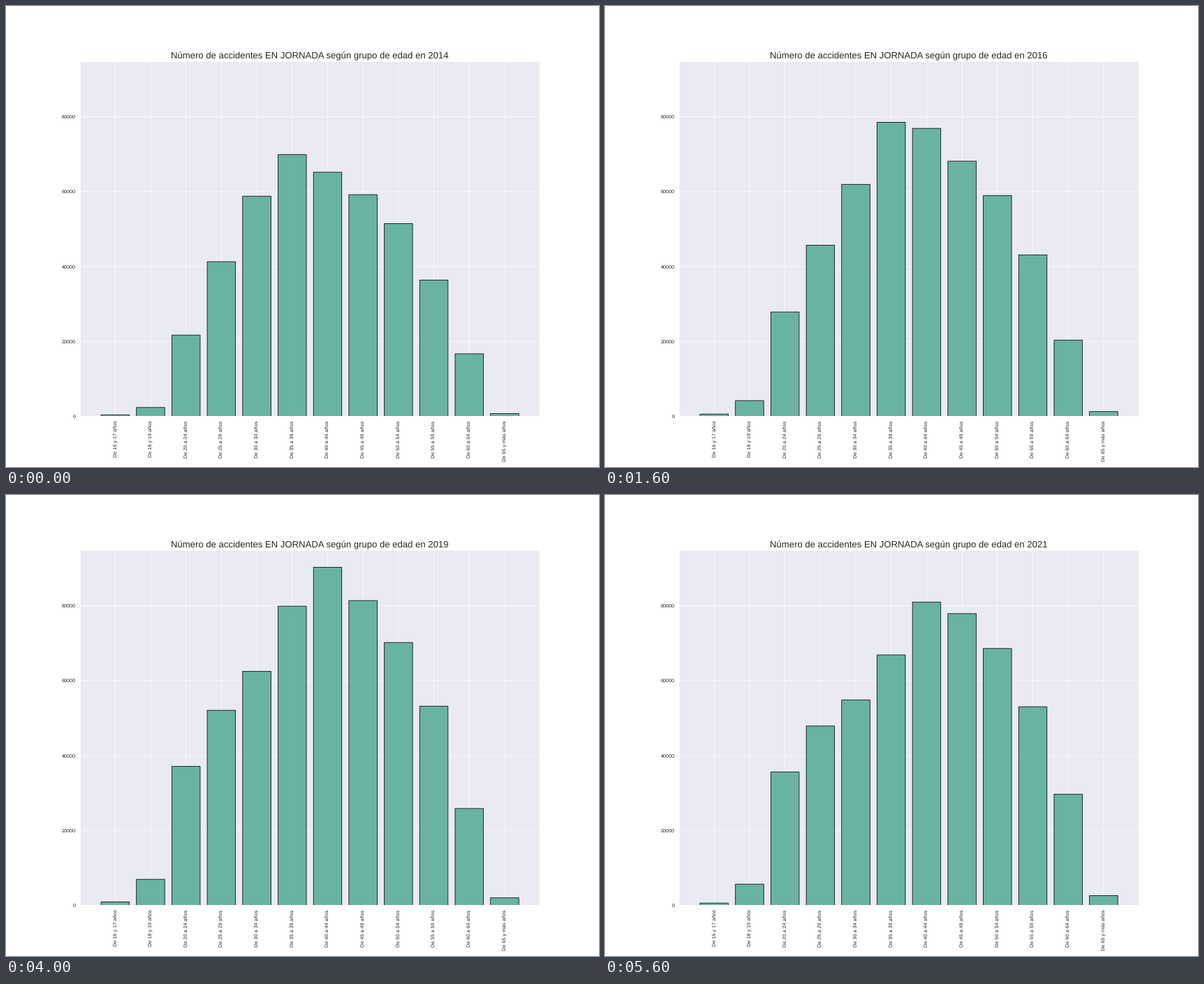
These frames come from a looping animation (849x660 px, 6400 ms). A matplotlib script:

```python
import matplotlib.pyplot as plt
import numpy as np
from matplotlib.animation import FuncAnimation

W, H = 849, 660
DPI = W / 18
INK = ".15"
FIRST, PEAK, LAST = 2014, 2019, 2021

GROUPS = ["De 16 y 17 años", "De 18 y 19 años"]
GROUPS += [f"De {a} a {a + 4} años" for a in range(20, 65, 5)]
GROUPS += ["De 65 y más años"]
X = np.arange(len(GROUPS))

# Thousands of accidents in the first year, and the rise up to the peak year
START = np.array([0.4, 2.35, 21.7, 41.3, 58.8, 69.9, 65.2, 59.2, 51.5, 36.4, 16.7, 0.75])
RISE = np.array([0.5, 4.6, 15.4, 10.8, 3.7, 10, 25.1, 22.2, 18.7, 16.8, 9.15, 1.25])

# Share of the peak-year level in the later years, by age group
KNOTS = [0, 2, 5, 7, 9, 11]
AFTER_PEAK = {
    2020: [0.55, 0.75, 0.745, 0.82, 0.855, 0.975],
    2021: [0.667, 0.96, 0.837, 0.957, 0.997, 1.3],
}

plt.rcParams.update({
    "font.family": "Liberation Sans",
    "text.color": INK,
    "text.hinting": "none",
    "axes.facecolor": "#EAEAF2",
    "axes.edgecolor": "white",
    "axes.linewidth": 1.25,
    "axes.axisbelow": True,
    "axes.grid": True,
    "grid.color": "white",
    "grid.linewidth": 1,
})


def counts_in(year):
    if year in AFTER_PEAK:
        share = np.interp(X, KNOTS, AFTER_PEAK[year])
        return 1000 * (START + RISE) * share
    t = (year - FIRST) / (PEAK - FIRST)
    # Ages around 35 to 39 grow early and then level off
    early = 25 * t * (1 - t) ** 1.5 * np.exp(-0.5 * ((X - 5) / 0.7) ** 2)
    return 1000 * (START + RISE * t + early)


# The tiny margin keeps the pixel size from rounding down
fig = plt.figure(figsize=(W / DPI + 1e-9, H / DPI + 1e-9), dpi=DPI, facecolor="white")
ax = fig.add_axes([0.125, 0.11, 0.775, 0.77])
bars = ax.bar(X, counts_in(FIRST), width=0.8, color="#69b3a2",
              edgecolor="black", linewidth=1.2, snap=False)
ax.set_xlim(-0.99, 11.99)
ax.set_ylim(0, 1050 * (START + RISE).max())
ax.set_xticks(X, GROUPS, rotation=90)
ax.set_yticks(range(0, 80001, 20000))
ax.tick_params(length=0, pad=9.5, labelsize=11, labelcolor=INK)
for line in ax.get_xgridlines() + ax.get_ygridlines():
    line.set_snap(False)
title = ax.set_title("", fontsize=20, pad=6)


def draw(i):
    year = FIRST + i
    for bar, count in zip(bars, counts_in(year)):
        bar.set_height(count)
    title.set_text(f"Número de accidentes EN JORNADA según grupo de edad en {year}")
    return [*bars, title]


anim = FuncAnimation(fig, draw, frames=LAST - FIRST + 1, interval=800,
                     repeat=True, repeat_delay=0, blit=False)
plt.show()
```
